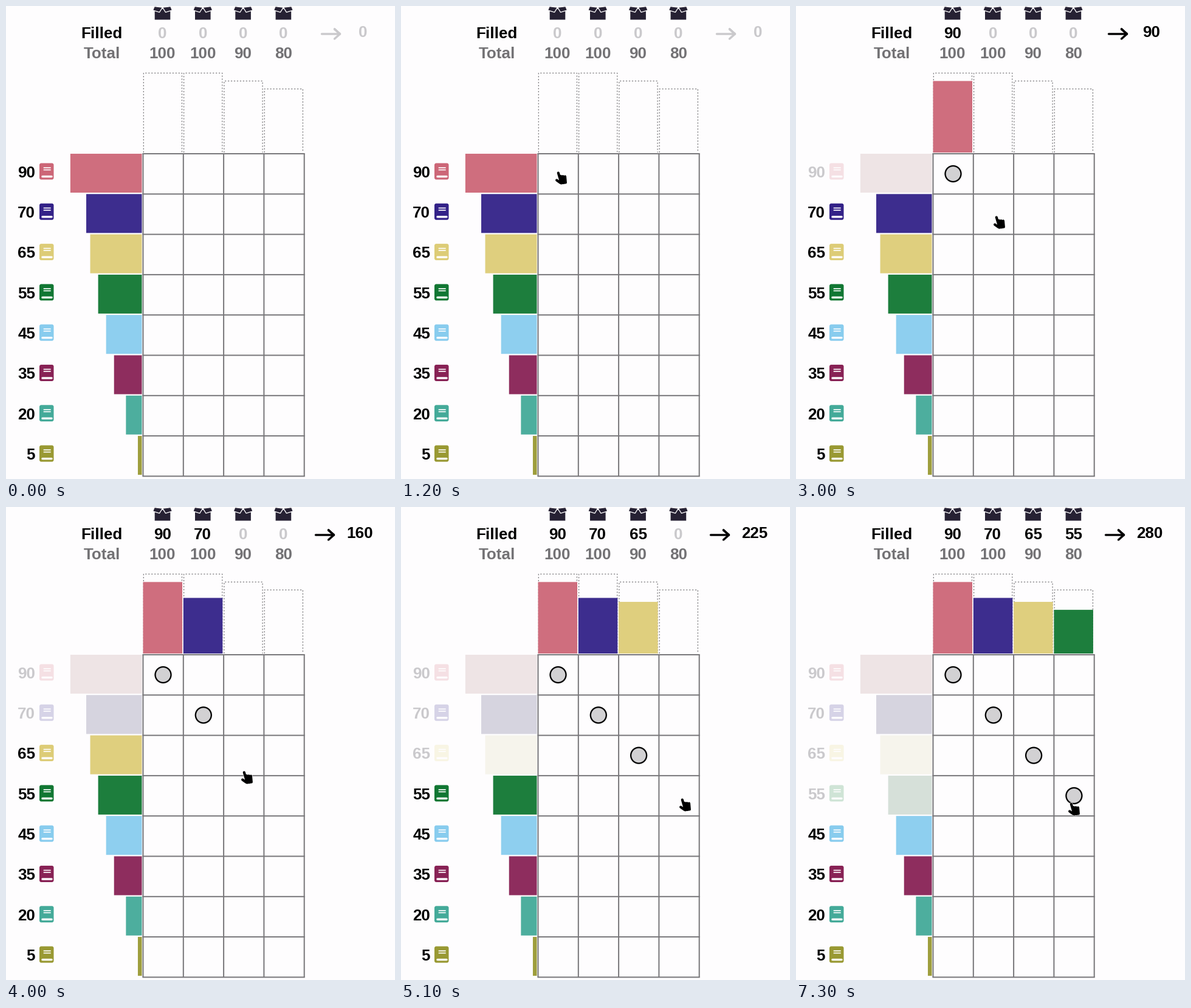
Animation of 640 by 778 pixels, one loop 8 s. Source, as a matplotlib script:

```python
import matplotlib.pyplot as plt
import numpy as np
from matplotlib.animation import FuncAnimation
from matplotlib.colors import to_rgb
from matplotlib.patches import Circle, FancyBboxPatch, Polygon, Rectangle

W, H, DPI = 640, 778, 100
STEP, LOOP = 100, 8000
PX = 72 / DPI

LEFT, TOP, CELL, UNIT = 225.5, 243, 66.3, 1.307
BOOKS = [90, 70, 65, 55, 45, 35, 20, 5]
BOXES = [100, 100, 90, 80]
COLORS = ["#cc6677", "#332288", "#ddcc77", "#117733",
          "#88ccee", "#882255", "#44aa99", "#999933"]
BACK, GRID, IDLE, MUTED, DARK = ("#fefdfe", "#78777a", "#cac9cc", "#737275",
                                 "#262133")

# Book i goes into box i at CLICKS[i] (ms).
CLICKS = [1500, 3600, 4500, 5300]
# Pointer moves: start ms, end ms, destination
ENTRY = (432, 400)
MOVES = [(100, 900, (263, 283)), (1700, 2500, (334, 356)),
         (3600, 4000, (396, 445)), (4000, 4300, (396, 426)),
         (4500, 5100, (467, 490)), (6600, 7100, (457, 497))]

fig = plt.figure(figsize=(W / DPI, H / DPI), dpi=DPI, facecolor=BACK)
ax = fig.add_axes([0, 0, 1, 1])
ax.set_xlim(0, W)
ax.set_ylim(H, 0)
ax.axis("off")


def tint(color, alpha):
    return tuple(alpha * np.array(to_rgb(color)) + 1 - alpha)


def faded(color):
    """Half desaturated, then mostly transparent."""
    rgb = np.array(to_rgb(color))
    gray = rgb @ (.3, .59, .11)
    return tint((rgb + gray) / 2, .2)


def bar(x, y, w, h, color, **kw):
    return ax.add_patch(Rectangle((x, y), w, h, fc=color, lw=0, snap=False,
                                  **kw))


def line(xs, ys, color, width, cap="butt", **kw):
    return ax.plot(xs, ys, color=color, lw=width * PX, snap=False,
                   solid_capstyle=cap, solid_joinstyle="round", **kw)[0]


def label(x, y, s, color, align="center"):
    return ax.text(x, y, s, color=color, ha=align, va="baseline",
                   family="Liberation Sans", weight="bold", size=26 * PX)


def draw_book(x, y, color):
    cover = ax.add_patch(FancyBboxPatch(
        (x + 3, y + 3), 17.5, 21, fc=color, lw=0,
        boxstyle="round,pad=3,rounding_size=3"))
    line([x + 5, x + 20], [y + 22] * 2, BACK, 3.4, "round")
    for top in (6.7, 10.2):
        bar(x + 6.7, y + top, 12, 1.7, BACK)
    return cover


def draw_box(cx):
    bar(cx - 12.8, 5, 25.6, 17.5, DARK)
    for side in (-1, 1):
        flap = np.array([(0, 2.2), (13.3, .6), (16, 7), (5, 10.3)])
        ax.add_patch(Polygon(flap * (side, 1) + (cx, 0), fc=DARK, ec=BACK,
                             lw=1.3 * PX, joinstyle="round"))


def hand_strokes(tilt=np.radians(8)):
    """Index finger, three knuckles and a thumb, separated by gaps."""
    gap = (np.nan, np.nan)
    strokes = [(-7.3, 2.5), (-2, 7.5), gap]
    for k in range(4):
        tip = -4 + .8 * k if k else -9
        strokes += [(-3 + 3.4 * k, tip), (-.5 + 2.4 * k, 8.5), gap]
    c, s = np.cos(tilt), np.sin(tilt)
    return np.array(strokes) @ np.array([[c, -s], [s, c]])


label(157.5, 53, "Filled", "black")
label(157.5, 86, "Total", MUTED)

rows = []
for i, (size, color) in enumerate(zip(BOOKS, COLORS)):
    y = TOP + CELL * i
    text = label(48, y + 38.7, str(size), "black", "right")
    cover = draw_book(55, y + 15.5, color)
    strip = bar(223.5 - size * UNIT, y, size * UNIT, 64, color)
    rows.append((text, cover, strip))

columns = []
for j, (size, color) in enumerate(zip(BOXES, COLORS)):
    x = LEFT + CELL * j
    draw_box(x + 32)
    label(x + 32, 86, str(size), MUTED)
    filled = label(x + 32, 53, "0", IDLE)
    top = 241 - size * UNIT
    line([x + .8, x + .8, x + 64, x + 64], [241, top, top, 241], "#6c6b6e", 1.1,
         linestyle=(0, (2, 2.5)), dash_capstyle="butt")
    h = BOOKS[j] * UNIT
    stack = bar(x, 241 - h, 64.5, h, tint(color, .95), zorder=3)
    token = ax.add_patch(Circle((x + 33, TOP + CELL * j + 33), 13,
                                fc="#d2d1d3", ec="black", lw=2.3 * PX,
                                zorder=4))
    columns.append((filled, stack, token))

for k in range(9):
    line([LEFT - 1, LEFT + 4 * CELL + 1], [TOP + CELL * k] * 2, GRID, 2)
for k in range(5):
    line([LEFT + CELL * k] * 2, [TOP, TOP + 8 * CELL], GRID, 2)

arrow = line([], [], IDLE, 3.4, "round")
total = label(587, 51, "0", IDLE)
HAND = hand_strokes()
pointer = [line([], [], color, width, "round", zorder=6)
           for color, width in ((BACK, 5.4), ("black", 4.2))]


def pointer_at(t):
    spot = np.array(ENTRY, float)
    for start, end, goal in MOVES:
        u = np.clip((t - start) / (end - start), 0, 1)
        spot += (goal - spot) * u * u * (3 - 2 * u)
    return spot


def update(frame):
    t = frame * STEP
    done = sum(t >= click for click in CLICKS)

    for i, (text, cover, strip) in enumerate(rows):
        used = i < done
        text.set_color(IDLE if used else "black")
        cover.set_facecolor(tint(COLORS[i], .2 if used else 1))
        strip.set_facecolor(faded(COLORS[i]) if used else tint(COLORS[i], .95))

    for j, (filled, stack, token) in enumerate(columns):
        used = j < done
        filled.set_text(str(BOOKS[j]) if used else "0")
        filled.set_color("black" if used else IDLE)
        stack.set_visible(used)
        token.set_visible(used)

    value = str(sum(BOOKS[:done]))
    extra = len(value) - 1
    total.set_text(value)
    total.set_x(587 - 2.6 * extra)
    tip = 549.5 - 5 * extra
    arrow.set_data([tip - 30, tip, tip - 9, tip, tip - 9],
                   [46, 46, 38, 46, 54])
    for part in (total, arrow):
        part.set_color("black" if done else IDLE)

    for layer in pointer:
        layer.set_visible(t >= MOVES[0][0])
        layer.set_data(*(HAND + pointer_at(t)).T)
    return []


anim = FuncAnimation(fig, update, frames=LOOP // STEP, interval=STEP,
                     repeat=True, repeat_delay=0, blit=False)
plt.show()
```
